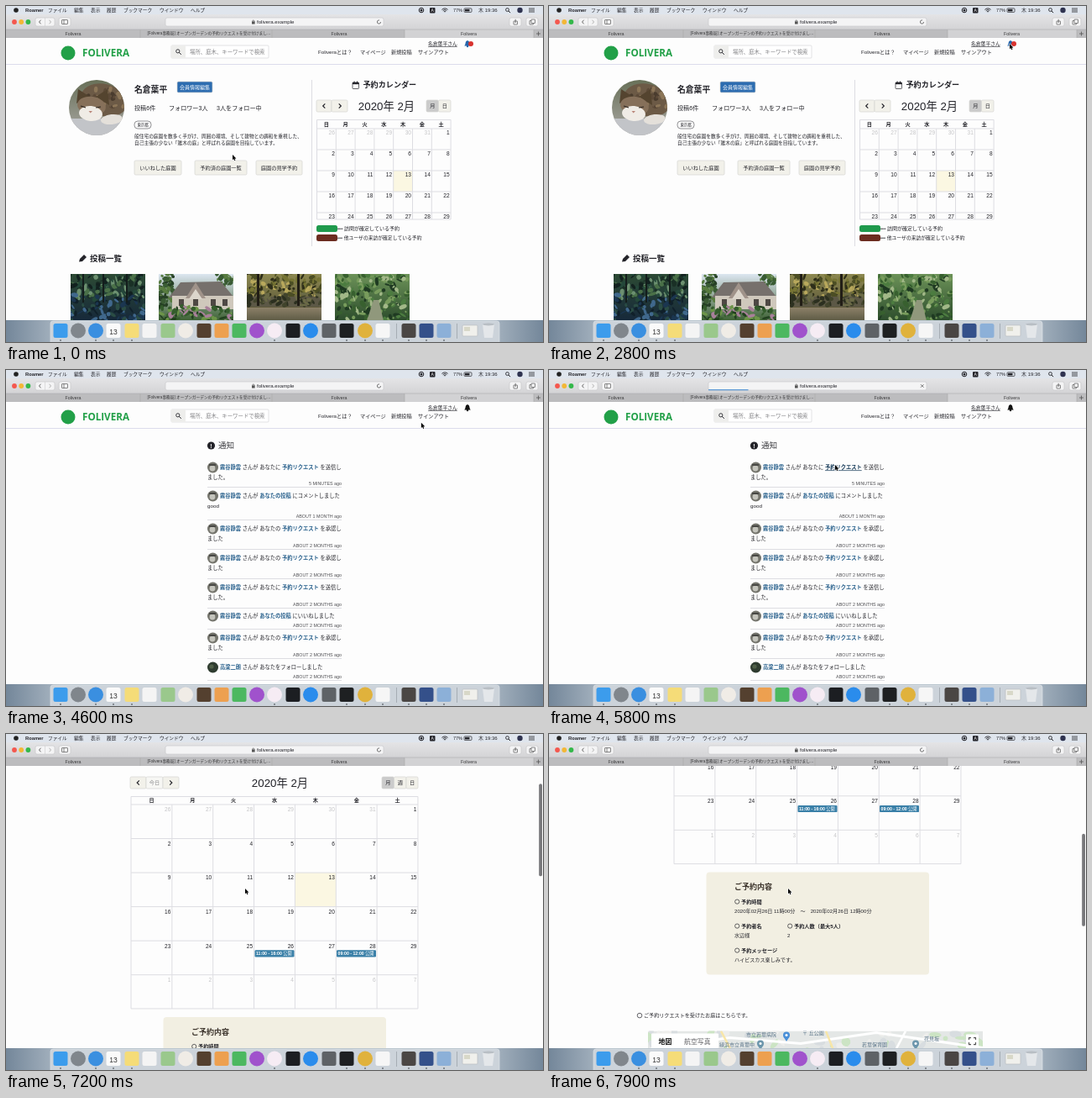
These frames come from a looping animation (640x400 px, 8 s). An HTML page with a canvas:

```html
<!DOCTYPE html>
<html lang="ja">
<head>
<meta charset="utf-8">
<title>Garden booking</title>
<style>
html, body { margin: 0; width: 100%; height: 100%; overflow: hidden; background: #fdfdfd; }
canvas { display: block; width: 640px; height: 400px; }
</style>
</head>
<body>
<canvas id="stage"></canvas>
<script>
const LOOP = 8000;
const SITE = 'Folivera', OWNER = '名倉葉平', GUEST = '霧谷静雲', FAN = '高梁二朗';
const FONT = '"Liberation Sans","Noto Sans CJK JP","Noto Sans CJK",sans-serif';
const INK = '#24242a', PAGE = '#fdfdfd', LINE = '#dddde2', PALE = '#f2f1ea', FADE = '#c6c6c8', LINK = '#28608c', GREEN = '#22a048';

const canvas = document.getElementById('stage');
const dpr = window.devicePixelRatio || 1;
canvas.width = 640 * dpr;
canvas.height = 400 * dpr;
const c = canvas.getContext('2d');

// ---- helpers ----
function text(s, x, y, size, color = INK, weight = 400, align = 'left') {
  c.font = `${weight} ${size}px ${FONT}`;
  c.fillStyle = color;
  c.textAlign = align;
  c.textBaseline = 'alphabetic';
  c.fillText(s, x, y + size * 0.36);
  return c.measureText(s).width;
}
function rect(x, y, w, h, color) {
  c.fillStyle = color;
  c.fillRect(x, y, w, h);
}
function round(x, y, w, h, r, fill, stroke) {
  c.beginPath();
  c.roundRect(x, y, w, h, r);
  if (fill) { c.fillStyle = fill; c.fill(); }
  if (stroke) { c.strokeStyle = stroke; c.lineWidth = 0.7; c.stroke(); }
}
function disc(x, y, r, color) {
  c.beginPath();
  c.arc(x, y, r, 0, 7);
  c.fillStyle = color;
  c.fill();
}
function oval(x, y, rx, ry, angle, color) {
  c.beginPath();
  c.ellipse(x, y, rx, ry, angle, 0, 7);
  c.fillStyle = color;
  c.fill();
}
function ring(x, y, r, color = INK, w = 0.7) {
  c.beginPath();
  c.arc(x, y, r, 0, 7);
  c.strokeStyle = color;
  c.lineWidth = w;
  c.stroke();
}
function path(points, color = LINE, w = 1) {
  c.beginPath();
  for (let i = 0; i < points.length; i += 2) c.lineTo(points[i], points[i + 1]);
  c.strokeStyle = color;
  c.lineWidth = w;
  c.stroke();
}
function poly(points, color) {
  c.beginPath();
  for (let i = 0; i < points.length; i += 2) c.lineTo(points[i], points[i + 1]);
  c.closePath();
  c.fillStyle = color;
  c.fill();
}
function clipped(shape, draw) {
  c.save();
  c.beginPath();
  shape();
  c.clip();
  draw();
  c.restore();
}
function shade(x, y, w, h, top, bottom) {
  const g = c.createLinearGradient(0, y, 0, y + h);
  g.addColorStop(0, top);
  g.addColorStop(1, bottom);
  rect(x, y, w, h, g);
}
function chevron(x, y, dir) {
  path([x - 1.3 * dir, y - 2.6, x + 1.3 * dir, y, x - 1.3 * dir, y + 2.6], INK, 1.2);
}
function magnifier(x, y, r) {
  ring(x, y, r, INK, 0.9);
  path([x + r * 0.7, y + r * 0.7, x + r * 1.9, y + r * 1.9], INK, 1);
}
function random(seed) {
  return () => (seed = (seed * 16807) % 2147483647) / 2147483647;
}
// keys: [time, value, time, value, ...]
function track(t, keys, ease = k => k) {
  if (t <= keys[0]) return keys[1];
  for (let i = 2; i < keys.length; i += 2) {
    if (t < keys[i]) {
      const k = (t - keys[i - 2]) / (keys[i] - keys[i - 2]);
      return keys[i - 1] + (keys[i + 1] - keys[i - 1]) * ease(k);
    }
  }
  return keys[keys.length - 1];
}
const smooth = k => k * k * (3 - 2 * k);

// ---- window frame ----
function menuBar() {
  rect(0, 0, 640, 10, '#dfe5ed');
  disc(12, 5, 2.8, '#222');
  text('Roamer', 23, 5, 5.8, INK, 700);
  [['ファイル', 50], ['編集', 81], ['表示', 101], ['履歴', 120], ['ブックマーク', 140], ['ウインドウ', 183], ['ヘルプ', 220]]
    .forEach(([s, x]) => text(s, x, 5, 5.7));
  ring(495, 5, 2.8, INK, 1);
  disc(495, 5, 1.5, INK);
  round(505, 2, 6.5, 6.5, 1, INK);
  text('A', 508.2, 5.2, 5, '#fff', 400, 'center');
  for (let r = 1.5; r < 6; r += 1.8) {
    c.beginPath();
    c.arc(523, 8, r, -2.35, -0.8);
    c.strokeStyle = INK;
    c.lineWidth = 0.9;
    c.stroke();
  }
  text('77%', 533, 5, 5.5);
  round(546, 2.8, 9, 4.6, 1, null, INK);
  rect(547, 3.8, 5.5, 2.6, INK);
  text('木 19:36', 563, 5, 6);
  magnifier(597.5, 4.5, 1.9);
  disc(612.5, 5, 3.2, '#2f3350');
  for (let y = 3; y < 8; y += 2) path([623, y, 630, y], INK, 0.8);
}
function toolBar(loading) {
  shade(0, 10, 640, 18, '#e4e4e6', '#d3d3d5');
  ['#f4574e', '#f3b735', '#34b84a'].forEach((color, i) => disc(10 + i * 8.2, 19, 2.9, color));
  round(35, 14, 23, 10, 2, '#f4f4f5', '#c9c9cb');
  path([46.5, 14, 46.5, 24], '#c9c9cb', 0.6);
  path([41.5, 16.7, 39.5, 19, 41.5, 21.3], '#555', 0.9);
  path([51.5, 16.7, 53.5, 19, 51.5, 21.3], '#aaa', 0.9);
  round(63, 14, 14, 10, 2, '#f4f4f5', '#c9c9cb');
  round(66.5, 16.5, 7, 5, 0.5, null, '#555');
  path([69, 16.5, 69, 21.5], '#555', 0.7);
  round(190, 14, 260, 10, 2, '#f4f4f5', '#cbcbcd');
  rect(293, 18.5, 3.6, 3, '#555');
  ring(294.8, 18.2, 1.2, '#555', 0.7);
  text('folivera.example', 299, 19, 6.1);
  if (loading) {
    rect(190, 23.2, loading, 1, '#3a86d0');
    path([443, 17.2, 446.5, 20.7], '#555', 0.8);
    path([446.5, 17.2, 443, 20.7], '#555', 0.8);
  } else {
    c.beginPath();
    c.arc(444.5, 19, 2.1, 0, 5);
    c.strokeStyle = '#555';
    c.lineWidth = 0.8;
    c.stroke();
  }
  [600, 620].forEach(x => round(x, 14, 14, 10, 2, '#f4f4f5', '#c9c9cb'));
  round(605, 18, 4.5, 4, 0.3, null, '#555');
  path([607.2, 20, 607.2, 15.8], '#555', 0.8);
  round(624, 17.5, 4.5, 4.5, 0.3, null, '#555');
  round(626, 16, 4.5, 4.5, 0.3, '#f4f4f5', '#555');

  rect(0, 28, 640, 10, '#bcbcbe');
  rect(475, 28, 154, 10, '#d2d2d4');
  [160, 317, 475, 629].forEach(x => path([x, 28, x, 38], '#a8a8aa', 0.6));
  path([0, 28, 640, 28], '#adadaf', 0.6);
  [80, 397, 551.5].forEach(x => text(SITE, x, 32.7, 5.3, '#38383a', 400, 'center'));
  text(`[${SITE}事務局] オープンガーデンの予約リクエストを受け付けまし…`, 242, 32.7, 4.7, '#38383a', 400, 'center');
  path([632, 33, 637, 33], '#555', 0.8);
  path([634.5, 30.5, 634.5, 35.5], '#555', 0.8);
}
const DOCK = [
  [65, '#3c9cec'], [86, '#80868c', 1], [107, '#3a8fe0', 1], [128, '#fafafa'], [150, '#f5dc78'], [171, '#f4f4f4'],
  [193, '#9ac88c'], [214, '#f0ece6', 1], [236, '#54402f'], [257, '#eda050'], [278, '#4cb860'], [299, '#a052cc', 1],
  [320, '#f6ecf4', 1], [342, '#1c1e22'], [363, '#2a8cec', 1], [385, '#5e6266'], [406, '#1e2022'], [428, '#e0b23c', 1],
  [449, '#f6f6f6'], [480, '#4a4644'], [501, '#34508a'], [522, '#8cb0d8']
];
function dock() {
  const g = c.createLinearGradient(0, 0, 640, 0);
  g.addColorStop(0, '#74879a');
  g.addColorStop(0.1, '#a9b6c2');
  g.addColorStop(0.9, '#a9b6c2');
  g.addColorStop(1, '#74879a');
  rect(0, 374, 640, 26, g);
  round(53, 375, 535, 28, 3, '#ccd3da', '#dde2e7');
  for (const [x, color, circle] of DOCK) {
    if (circle) disc(x, 386.5, 9, color);
    else round(x - 8.5, 378, 17, 17, 2.5, color);
  }
  text('13', 128, 388, 8.5, '#333', 400, 'center');
  [465.5, 537.5].forEach(x => path([x, 378, x, 396], '#949ca4', 0.7));
  round(544, 380, 18, 13, 1, '#f0f0ec', '#b8bcc0');
  rect(546, 382, 7, 5, '#d8d8c8');
  poly([568, 379, 582, 379, 580, 395, 570, 395], '#e4e7ea');
  oval(575, 379, 7, 1.5, 0, '#b8bec4');
  [65, 107, 128, 150, 320, 406, 428, 449, 480, 501, 522].forEach(x => disc(x, 398, 0.8, '#2c3036'));
}

// ---- site parts ----
function bell(x, y, color) {
  c.beginPath();
  c.moveTo(x - 3.7, y + 2.4);
  c.quadraticCurveTo(x - 2.4, y + 1, x - 2.4, y - 1);
  c.quadraticCurveTo(x - 2.2, y - 3.7, x, y - 4);
  c.quadraticCurveTo(x + 2.2, y - 3.7, x + 2.4, y - 1);
  c.quadraticCurveTo(x + 2.4, y + 1, x + 3.7, y + 2.4);
  c.closePath();
  c.fillStyle = color;
  c.fill();
  disc(x, y + 3, 1.2, color);
}
function wordmark() {
  const family = '"Open Sans","Noto Sans",sans-serif', s = SITE.toUpperCase();
  c.font = `700 extra-condensed 10px ${family}`;
  const size = Math.min(20, 560 / c.measureText(s).width);
  c.font = `700 extra-condensed ${size}px ${family}`;
  c.textAlign = 'left';
  c.fillStyle = GREEN;
  c.fillText(s, 91, 56 + size * 0.36);
}
function siteHeader(badge) {
  disc(74, 56, 8.5, GREEN);
  wordmark();
  round(197, 47, 116, 15, 1, '#fff', '#d6d6d8');
  rect(197, 47, 17, 15, '#eeeeec');
  magnifier(204.8, 53.8, 2.1);
  text('場所、庭木、キーワードで検索', 219, 54.7, 6.4, '#858588');
  text(SITE + 'とは？', 372, 55, 6.2);
  [['マイページ', 422], ['新規投稿', 459], ['サインアウト', 491]].forEach(([s, x]) => text(s, x, 55, 6.15));
  const w = text(OWNER + 'さん', 503, 45, 5.8);
  path([503, 48.4, 503 + w, 48.4], INK, 0.6);
  bell(550, 45, badge ? '#2566ac' : '#111');
  if (badge) disc(554, 45, 3, '#d8322e');
  path([0, 69.5, 640, 69.5], '#dcdcec');
}
function button(label, x, y, w, h, size = 6.2, fill = PALE, color = INK) {
  round(x, y, w, h, 1.5, fill, '#d4d4d2');
  if (label) text(label, x + w / 2, y + h / 2, size, color, 400, 'center');
}
function cal(x, y, cw, rh, head, rows, bottom, size, dy) {
  const top = y + head, w = cw * 7;
  rect(x + 4 * cw, top + 2 * rh, cw, rh, '#fbf7e2');
  for (let i = 0; i <= 7; i++) path([x + i * cw, i % 7 ? top : y, x + i * cw, bottom]);
  path([x, y, x + w, y]);
  for (let r = 0; r < rows; r++) path([x, top + r * rh, x + w, top + r * rh]);
  path([x, bottom, x + w, bottom]);
  [...'日月火水木金土'].forEach((s, i) => text(s, x + (i + 0.5) * cw, y + head / 2, size - 0.4, INK, 700, 'center'));
  for (let i = 0; i < rows * 7; i++) {
    const other = i < 6 || i > 34;
    const day = i < 6 ? 26 + i : i < 35 ? i - 5 : i - 34;
    text(day, x + (i % 7 + 1) * cw - 1.5, top + Math.floor(i / 7) * rh + dy, size, other ? FADE : INK, 400, 'right');
  }
}

// ---- profile page ----
function foliage(x, y, w, h, colors, n, seed, scale = 1) {
  const rnd = random(seed);
  for (let i = 0; i < n; i++) {
    oval(x + rnd() * w, y + rnd() * h, (1 + rnd() * 4) * scale, (0.7 + rnd() * 2.3) * scale, rnd() * 3, colors[i % colors.length]);
  }
}
function photo(x, top, bottom, draw) {
  clipped(() => c.rect(x, 319, 89, 56), () => {
    shade(x, 319, 89, 56, top, bottom);
    draw(x);
  });
}
function photos() {
  photo(77, '#2c4a34', '#16283a', x => {
    foliage(x, 319, 89, 30, ['#1a3026', '#4a7048', '#12211f', '#6c9070', '#24483a'], 110, 11);
    foliage(x, 344, 89, 30, ['#1b3650', '#40688c', '#10202a', '#2a4c44'], 90, 7);
    [14, 38, 66].forEach(d => rect(x + d, 319, 2, 34, '#141d1c'));
  });
  photo(182, '#dce6f0', '#3c6032', x => {
    foliage(x, 319, 18, 40, ['#3a5c34', '#587c40', '#263f26'], 50, 5);
    foliage(x + 68, 319, 24, 14, ['#3a5c34', '#587c40'], 24, 15);
    poly([x + 12, 347, x + 26, 329, x + 74, 328, x + 89, 346], '#76706c');
    rect(x + 16, 345, 73, 16, '#cfc8bc');
    poly([x + 32, 348, x + 44, 329, x + 56, 348], '#a0938a');
    poly([x + 36, 349, x + 44, 337, x + 52, 349], '#dcd6cc');
    [24, 41, 62, 76].forEach(d => rect(x + d, 349, 6, 8, '#4e4844'));
    foliage(x, 358, 89, 18, ['#345c2c', '#6c9448', '#22401f', '#a8809a'], 80, 9);
  });
  photo(287, '#8c8850', '#4c4632', x => {
    foliage(x, 317, 89, 28, ['#4c4e24', '#b8a85c', '#2e2e1a', '#767434'], 120, 21);
    rect(x, 346, 89, 12, '#5c5846');
    foliage(x, 342, 89, 14, ['#2c3020', '#6a6a46', '#41442c'], 60, 13);
    [12, 60].forEach(d => rect(x + d, 319, 3, 38, '#221e16'));
    shade(x, 359, 89, 16, '#8c8068', '#5c5a44');
  });
  photo(392, '#6c9258', '#2c4c2c', x => {
    foliage(x, 319, 89, 56, ['#38602f', '#789c5c', '#1f3a22', '#a2b888', '#4c7c40'], 190, 33);
    poly([x + 38, 375, x + 46, 350, x + 52, 350, x + 58, 375], '#90987c');
  });
}
function catPicture() {
  clipped(() => c.arc(108, 121, 33, 0, 7), () => {
    shade(75, 88, 66, 66, '#687058', '#aaa8a4');
    rect(75, 134, 66, 20, '#c2c4c8');
    oval(117, 112, 28, 19, 0.25, '#6c5a46');
    foliage(96, 98, 44, 24, ['#4a3c2e', '#8c7658', '#5c4a38'], 40, 3, 0.9);
    poly([84, 116, 86, 99, 100, 108], '#54442f');
    poly([107, 108, 121, 99, 123, 118], '#54442f');
    oval(102, 119, 17, 11, 0.15, '#86705a');
    oval(101, 128, 14, 9, 0.1, '#f0ece6');
    oval(126, 135, 13, 6, -0.1, '#e4e0da');
    path([89, 119, 95, 121], '#2c2620', 1.2);
    path([107, 121, 113, 120], '#2c2620', 1.2);
    poly([98.5, 125, 103, 125, 100.7, 127.6], '#b98578');
  });
}
function profilePage() {
  siteHeader(true);
  catPicture();
  text(OWNER, 153, 99, 9.8, INK, 700);
  button('会員情報編集', 204, 90, 42, 13, 6, '#2c6cb0', '#fff');
  text('投稿6件', 153, 121, 7.1);
  text('フォロワー3人', 194, 121, 7.1);
  text('3人をフォロー中', 251, 121, 7.1);
  round(153, 137, 20, 9, 4, null, '#66666a');
  text('東京都', 163, 141.6, 4.4, INK, 400, 'center');
  text('般住宅の庭園を数多く手がけ、周囲の環境、そして建物との調和を重視した、', 153, 155, 5.72);
  text('自己主張の少ない「雑木の庭」と呼ばれる庭園を目指しています。', 153, 163, 5.72);
  button('いいねした庭園', 153, 184, 56, 17);
  button('予約済の庭園一覧', 225, 184, 62, 17);
  button('庭園の見学予約', 298, 184, 55, 17);
  path([364.5, 88, 364.5, 286]);

  round(413, 91, 7.5, 7.5, 0.8, null, INK);
  rect(413, 91, 7.5, 2.2, INK);
  rect(414.6, 89.6, 1, 2, INK);
  rect(418, 89.6, 1, 2, INK);
  text('予約カレンダー', 425.5, 94, 9.1, INK, 700);
  button('', 370, 112, 18, 14);
  button('', 388, 112, 19, 14);
  chevron(379, 119, -1);
  chevron(398, 119, 1);
  text('2020年 2月', 453.5, 119, 13.3, INK, 400, 'center');
  button('月', 501, 112, 14.5, 14, 6.2, '#cbcbcb');
  button('日', 515.5, 112, 14.5, 14);
  cal(370.5, 135.5, 22.8, 25, 10.5, 5, 254, 6.6, 5);
  round(370, 261, 25, 8, 2.5, '#1f9a4c');
  text('••• 訪問が確定している予約', 395, 265, 6);
  round(370, 272, 25, 8, 2.5, '#6c2c20');
  text('••• 他ユーザの来訪が確定している予約', 395, 276, 5.8);

  poly([87, 304.5, 88, 301, 93, 296, 96, 299, 91, 304], INK);
  text('投稿一覧', 100, 300.5, 9.5, INK, 700);
  photos();
}

// ---- notices page ----
const ASK = ['あなたに', '予約リクエスト', 'を送信し', 'ました。'];
const OKAY = ['あなたの', '予約リクエスト', 'を承認し', 'ました'];
const NOTICES = [
  [116, 135, '5 MINUTES', ASK],
  [150, 174, 'ABOUT 1 MONTH', ['', 'あなたの投稿', 'にコメントしました', 'good']],
  [189, 209, 'ABOUT 2 MONTHS', OKAY],
  [224, 244, 'ABOUT 2 MONTHS', OKAY],
  [259, 279, 'ABOUT 2 MONTHS', ASK],
  [293, 304, 'ABOUT 2 MONTHS', ['', 'あなたの投稿', 'にいいねしました', '']],
  [319, 339, 'ABOUT 2 MONTHS', OKAY],
  [354, 365, 'ABOUT 2 MONTHS', ['あなたをフォローしました', '', '', '']]
];
function noticesPage(hover) {
  siteHeader(false);
  disc(244.5, 90, 4.6, INK);
  text('!', 244.5, 90, 7, '#fff', 700, 'center');
  text('通知', 253, 90, 9.6, '#3c3c40');
  NOTICES.forEach(([y, timeY, ago, [lead, link, tail, more]], i) => {
    const last = i === 7;
    disc(246.5, y, 6.5, last ? '#2f3c30' : '#74746c');
    if (last) disc(245, y - 1, 2.6, '#506048');
    else {
      disc(246, y + 1, 3.4, '#c4c4bc');
      rect(242, y - 4, 8, 2, '#484844');
    }
    let x = 255;
    const add = (s, color, weight) => { if (s) x += text(s, x, y, 6.25, color, weight); };
    add(last ? FAN : GUEST, LINK, 700);
    add(' さんが ' + (lead && lead + ' '));
    const start = x, hot = hover && i === 0;
    add(link, hot ? '#163a58' : LINK, 700);
    if (hot) path([start, y + 3.6, x, y + 3.6], '#163a58', 0.7);
    add(tail && ' ' + tail);
    text(more, 240, y + 11.5, 6.25);
    text(ago + ' ago', 400, timeY, 5.35, '#4c4c50', 400, 'right');
    path([240, timeY + 4.5, 400, timeY + 4.5]);
  });
}

// ---- request page, in document coordinates ----
function pin(x, y, color) {
  disc(x, y, 4, color);
  poly([x - 3.2, y + 2.4, x + 3.2, y + 2.4, x, y + 7.5], color);
  disc(x, y, 1.5, '#fff');
}
function map() {
  clipped(() => c.rect(118, 582, 399, 90), () => {
    rect(118, 582, 399, 90, '#e4e7e6');
    foliage(118, 582, 399, 26, ['#cce4c4', '#eeeeec', '#d8dde0'], 60, 17, 1.8);
    path([118, 604, 215, 590, 300, 597, 390, 584, 517, 602], '#fff', 3);
    path([205, 582, 225, 620], '#f8e6a8', 2.5);
    path([330, 582, 345, 620], '#f8e6a8', 2.5);
    path([425, 582, 405, 620], '#fff', 2.5);
    pin(283, 587, '#4a90d8');
    pin(252, 597, '#6c96ac');
    pin(437, 597, '#6c96ac');
    text('市立若葉病院', 235, 586, 6, '#5a7488');
    text('緑浜市立青葉中', 203, 598, 6, '#5a7488');
    text('〒 丘公園', 302, 584, 6, '#5a7488');
    text('若葉保育園', 373, 598, 6, '#5a7488');
    text('花見坂', 447, 591, 6, '#5a7488');
  });
  round(122, 585, 80, 21, 1, '#fff');
  text('地図', 130.5, 594.5, 7.9, '#111', 700);
  text('航空写真', 161, 594.5, 7.9, '#606064');
  round(497, 586, 15, 20, 1, '#fff');
  for (const [sx, sy] of [[-1, -1], [1, -1], [1, 1], [-1, 1]]) {
    const x = 504.5 + sx * 4, y = 594 + sy * 4;
    path([x - sx * 2.5, y, x, y, x, y - sy * 2.5], '#555', 1.1);
  }
}
function field(label, x, y, value) {
  ring(x + 3.2, y, 2.6);
  text(label, x + 8, y, 6.2, INK, 700);
  text(value, x, y + 11, 6.1);
}
function requestPage() {
  siteHeader(false);
  oval(117.5, 86, 5.2, 2.8, -0.5, INK);
  text('庭園の訪問予約リクエスト', 127, 85, 9.35, INK, 700);
  button('', 148, 107, 19, 14);
  button('今日', 167, 107, 20, 14, 6.2, '#f7f7f4', '#88888a');
  button('', 187, 107, 19, 14);
  chevron(157.5, 114, -1);
  chevron(196.5, 114, 1);
  text('2020年 2月', 326.5, 114, 13.3, INK, 400, 'center');
  button('月', 448, 107, 14.5, 14, 6.2, '#cbcbcb');
  button('週', 462.5, 107, 14.5, 14);
  button('日', 477, 107, 14, 14);
  cal(149, 130.5, 48.85, 40.55, 9.5, 6, 383, 6.5, 6);
  [[296.5, '11:00 - 16:00'], [394, '09:00 - 12:00']].forEach(([x, hours]) => {
    round(x, 313.3, 47, 8.2, 1.2, '#3a80a8');
    const w = text(hours, x + 1.5, 317.4, 5.2, '#fff', 700);
    text(' 公開', x + 1.5 + w, 317.4, 5.2, '#fff');
  });

  round(187.5, 393, 265.5, 122, 4, '#f2efe2');
  text('ご予約内容', 221, 410.5, 9, '#3c342c', 700);
  field('予約時間', 221, 428, '2020年02月26日 11時00分　〜　2020年02月26日 12時00分');
  field('予約者名', 221, 457, '水辺様');
  field('予約人数（最大5人）', 284, 457, '2');
  field('予約メッセージ', 221, 486, 'ハイビスカス楽しみです。');
  ring(108, 563.5, 2.8);
  text('ご予約リクエストを受けたお庭はこちらです。', 113, 563.5, 6.1);
  map();
}

// ---- timeline ----
function cursor(x, y) {
  c.save();
  c.translate(x, y);
  const shape = [0, 0, 0, 6.2, 1.4, 5, 2.4, 7.2, 3.4, 6.7, 2.5, 4.7, 4.4, 4.5, 0, 0];
  path(shape, '#fff', 1.2);
  poly(shape, '#000');
  c.restore();
}
function draw(t) {
  const scroll = track(t, [6400, 0, 6700, 46, 7000, 50, 7400, 62, 7700, 140, 7900, 228, 8000, 268]);
  const x = track(t, [1400, 270, 2600, 549, 4200, 549, 5400, 341, 6000, 341, 6500, 285], smooth);
  const y = track(t, [1400, 177, 2600, 45, 4200, 45, 5400, 113, 6000, 113, 6500, 184], smooth);
  let loading = 0;
  if (t >= 3000 && t < 3800) loading = track(t, [3000, 14, 3400, 30, 3800, 200]);
  if (t >= 5600 && t < 6100) loading = track(t, [5600, 20, 5800, 47, 6100, 200]);

  c.setTransform(dpr, 0, 0, dpr, 0, 0);
  rect(0, 0, 640, 400, PAGE);
  clipped(() => c.rect(0, 38, 640, 336), () => {
    if (t < 3200) profilePage();
    else if (t < 6000) noticesPage(x < 373 && y > 110);
    else {
      c.translate(0, -scroll);
      requestPage();
    }
  });
  if (t >= 6400) round(635.2, 40 + scroll * 0.345, 3.8, 110, 1.9, '#77777a');
  menuBar();
  toolBar(loading);
  dock();
  cursor(x, y);
}
function frame() {
  draw(performance.now() % LOOP);
  requestAnimationFrame(frame);
}
frame();
</script>
</body>
</html>
```
